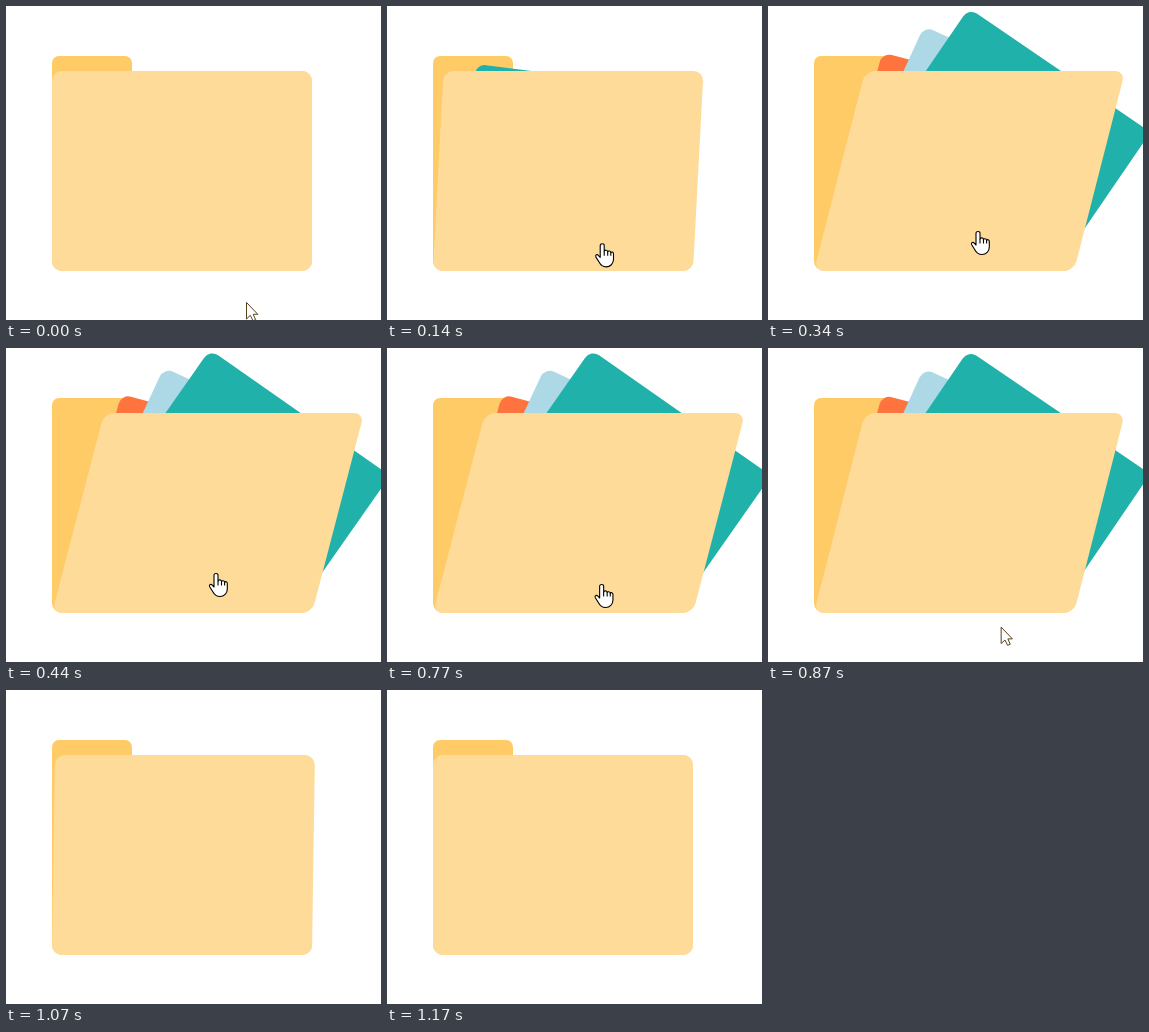
An HTML page that plays this animation: 375x314 px, repeating every 1640 ms.

```html
<!DOCTYPE html>
<html lang="en">
<head>
<meta charset="utf-8">
<title>Folder opening on hover</title>
<style>
  html, body { margin: 0; width: 100%; height: 100%; overflow: hidden; background: #fff; }
  svg { display: block; }
</style>
</head>
<body>
<svg width="375" height="314" viewBox="0 0 375 314">
  <path fill="#ffcb67" d="M46 57a7 7 0 0 1 7-7H119a7 7 0 0 1 7 7V65H296a10 10 0 0 1 10 10V255a10 10 0 0 1-10 10H56a10 10 0 0 1-10-10Z"/>
  <g id="papers"></g>
  <rect id="front" y="-200" width="260" height="200" rx="10" fill="#ffdb9a"/>
  <path id="arrow" fill="#fff" stroke="#58401f" d="M.5.5V17L4.3 13.4L7 18.8L9.6 17.6L7.2 12.3H11.8Z"/>
  <g id="hand" stroke="#000" stroke-width="1.1" stroke-linejoin="round">
    <path fill="#fff" d="M-2 14V2.3C-2-.2 2-.2 2 2.3V8C2.5 6.3 5.5 6.5 5.5 8.6C6 7.2 8.6 7.4 8.6 9.4C9.2 8.2 11.3 8.5 11.3 10.6V16C11.3 20.5 8 23.5 4 23.5C0 23.5-1.5 22-3 19L-6.3 13.8C-7.4 11.4-4.9 10.6-3.7 12.2Z"/>
    <path fill="none" d="M2 8V12.5M5.5 8.6V12.5M8.6 9.4V12.5"/>
  </g>
</svg>
<script>
const LOOP = 1640, FADE = 300, ENTER = 92, LEAVE = 859;
const STEPS = [0, 50, 100, 140, 190, 240, 290, 340, 390, 440,
               770, 820, 870, 920, 970, 1020, 1070, 1120, 1170];

// Each centre moves by p * (linear + p * bend) while the sheet turns.
const PAPERS = [
  { fill: '#ff733f', turn: 15, linear: [24, -20], bend: [2, 9] },
  { fill: '#add8e6', turn: 25, linear: [40.5, -44], bend: [9.5, 20] },
  { fill: '#20b2aa', turn: 35, linear: [58, -64], bend: [17, 32] },
];

const $ = id => document.getElementById(id);
const place = (el, value) => el.setAttribute('transform', value);
const clamp = v => Math.min(1, Math.max(0, v));

for (const paper of PAPERS) {
  paper.el = document.createElementNS('http://www.w3.org/2000/svg', 'rect');
  const attrs = { x: -110, y: -75, width: 220, height: 150, rx: 10, fill: paper.fill };
  for (const key in attrs) paper.el.setAttribute(key, attrs[key]);
  $('papers').append(paper.el);
}

// cubic-bezier(.25, .1, .25, 1), solved by bisection
function ease(x) {
  if (x <= 0 || x >= 1) return clamp(x);
  const curve = (a, b, s) => 3 * a * s * (1 - s) ** 2 + 3 * b * s * s * (1 - s) + s ** 3;
  let low = 0, high = 1;
  for (let i = 0; i < 24; i++) {
    const mid = (low + high) / 2;
    if (curve(.25, .25, mid) < x) low = mid; else high = mid;
  }
  return curve(.1, 1, low);
}

function drawFolder(p) {
  place($('front'), `translate(46 265) skewX(${-14.6 * p})`);
  for (const { el, turn, linear, bend } of PAPERS) {
    const [dx, dy] = linear.map((v, i) => p * (v + p * bend[i]));
    place(el, `translate(${176 + dx} ${158 + dy}) rotate(${turn * p})`);
  }
}

function drawCursor(t) {
  const away = t < 770 ? (1 - clamp(t / 240)) ** 2 : clamp(.155 + (t - 770) * .006);
  const over = t > ENTER && t < LEAVE;
  const at = `translate(${210 + 30 * away} ${225 + 71 * away})`;
  for (const id of ['arrow', 'hand']) {
    const shown = t < 970 && over === (id === 'hand');
    $(id).style.display = shown ? '' : 'none';
    place($(id), at);
  }
}

function frame() {
  const now = performance.now() % LOOP;
  const t = STEPS.findLast(s => s <= now);
  drawFolder(ease((t - ENTER) / FADE) - ease((t - LEAVE) / FADE));
  drawCursor(t);
  requestAnimationFrame(frame);
}
frame();
</script>
</body>
</html>
```
